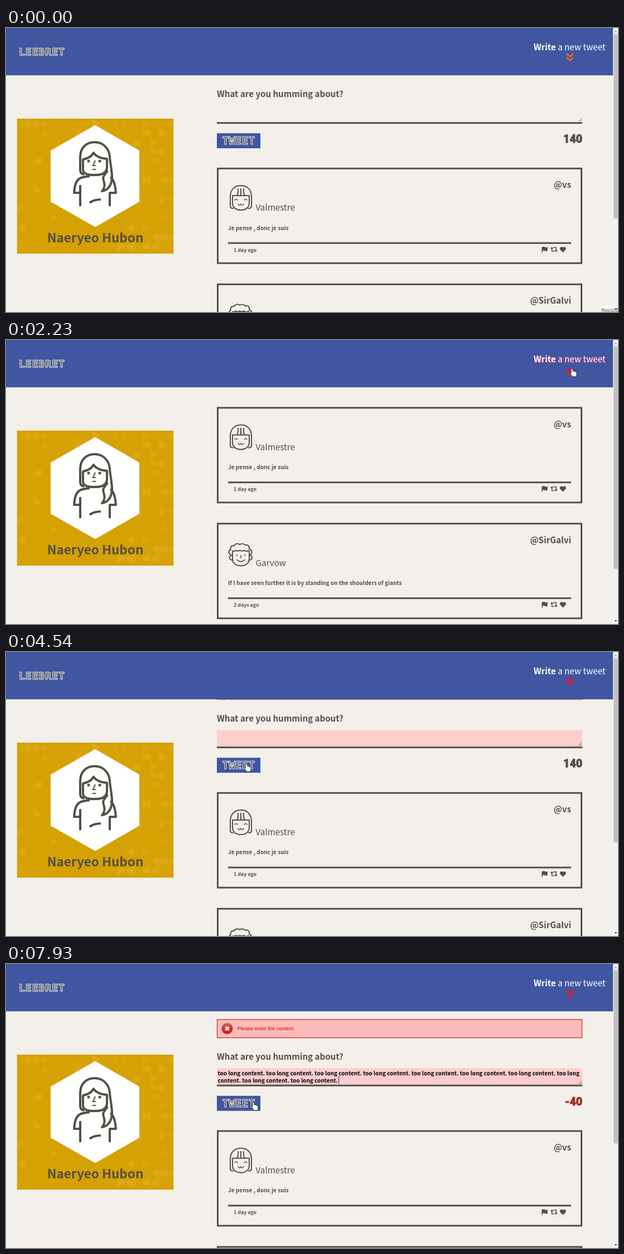
An HTML page for the animation above (8 s loop, 1097 by 510 pixels).

```html
<!DOCTYPE html>
<html lang="en">
<head>
<meta charset="utf-8">
<title>Short message page</title>
<style>
html, body { margin: 0; width: 100%; height: 100%; overflow: hidden; background: #f3f0eb }
svg { display: block }
text { font: 600 15.1px "Noto Sans CJK JP", "Noto Sans CJK SC", "Noto Sans CJK KR", "Open Sans", sans-serif; fill: inherit; white-space: pre }
.thin { font-weight: 200; font-size: 15.2px }
.body { font-size: 10.05px }
.small { font-size: 8.85px }
.chunky { font: bold 19px "DejaVu Sans Mono", monospace; stroke: currentColor; stroke-width: .9; letter-spacing: .35px }
.count { font: 900 19.5px Roboto, sans-serif; stroke: currentColor; stroke-width: .8 }
.alert { font: 9.3px "Liberation Sans", Arial, sans-serif }
.end { text-anchor: end }
.line { fill: none; stroke: #544f45; stroke-width: 2; stroke-linecap: round; stroke-linejoin: round }
</style>
</head>
<body>
<svg id="stage" width="1097" height="510" fill="#544f45">
  <defs>
    <g id="link"><text class="end" x="1074.5" y="40">Write<tspan class="thin"> a new tweet</tspan></text></g>
    <clipPath id="fold"><rect id="foldBox" x="370" y="85" width="680" height="140"/></clipPath>
    <radialGradient id="ball" cy=".3"><stop stop-color="#ef6a60"/><stop offset="1" stop-color="#d0211c"/></radialGradient>
    <g id="actions">
      <path d="M961 393v10M962 394q2-1.500 4 0t4 0v5.500q-2 1.500-4 0t-4 0z" stroke="#544f45" stroke-width="1.400"/>
      <path d="M978.500 395v6h4.500M981 394h5v6" fill="none" stroke="#544f45" stroke-width="1.600"/>
      <path d="M975.500 396.500l3-3.500 3 3.500zM983 399l3 3.500 3-3.500z"/>
      <path d="M998.300 403l-4.800-4.800c-2.500-3.500 2.500-7.200 4.800-3.700 2.300-3.500 7.300.2 4.800 3.700z"/>
    </g>
  </defs>

  <rect width="1097" height="510" fill="#f3f0eb"/>

  <svg x="19.500" y="162.500" width="281" height="243">
    <rect width="281" height="243" fill="#d5a103"/>
    <g id="tiles" fill="#e6bd4a"></g>
  </svg>
  <path d="M160 174.500l79 45.500v92l-79 45.500-80-45.500v-92z" fill="#fff"/>
  <g class="line" style="stroke-width:4;stroke-linecap:butt">
    <path d="M140 263q-7-1-7-8v-23c0-18 12-27 26-27s26 10 27 27c1 14 4 22 4 36 0 14-8 24-18 25 6-6 5-13 3-19-3-7 3-11 7-18"/>
    <path d="M138 236v17c0 9 8 11 20 11s22-2 23-13v-16c-10-1-19-3-24-11-3 6-8 10-19 12z"/>
    <path d="M150 266c-18 2-26 3-28 30h11M133 282v38M187 268c7 4 9 16 10 28h-11v24M150 314q7-6 20-6"/>
    <path d="M160 238l-4 9h5M155 254h6" stroke-width="2"/>
  </g>
  <circle cx="148" cy="239" r="2.500"/><circle cx="168" cy="239" r="2.500"/>
  <text x="160" y="385" text-anchor="middle" fill="#fff" style="font-size:22.5px">Naeryeo Hubon</text>

  <svg id="error" x="378" y="85" width="655" height="0" fill="#d8000c">
    <rect width="100%" height="100%" fill="#ffbaba" stroke="#d8000c" stroke-width="2"/>
    <circle cx="18.500" cy="50%" r="10" fill="url(#ball)" stroke="#a99" />
    <svg x="14.500" y="50%" width="8" height="8" overflow="visible"><path d="M1-3l6 6m0-6l-6 6" stroke="#fff" stroke-width="2.600"/></svg>
    <text id="errorText" class="alert" x="36.500">Please enter the content.</text>
  </svg>

  <g id="form"><g clip-path="url(#fold)">
    <text x="378" y="124">What are you humming about?</text>
    <rect id="field" x="378" y="139.500" width="655" height="30" fill="#ffcdcd"/>
    <rect x="378" y="169" width="655" height="3"/>
    <path d="M1026.500 168l5.500-5.500m-2.500 5.500l2.500-2.500" stroke="#544f45" stroke-width=".9"/>
    <g id="typed" fill="#000">
      <text class="body" id="row1" x="379.500" y="152"></text>
      <text class="body" id="row2" x="379.500" y="165"></text>
    </g>
    <rect id="caret" width="1" height="14.500" fill="#444"/>
    <rect x="378" y="189" width="78" height="27" fill="#4056a1"/>
    <text class="chunky" x="387.500" y="209" fill="#fff" color="#fff">TWEET</text>
    <text id="count" class="count end" x="1033" y="206">140</text>
  </g></g>

  <g id="cards"></g>

  <rect width="1088" height="85" fill="#4056a1"/>
  <text class="chunky" x="23" y="48.500" fill="#fff" color="#fff" style="font-size:18.500px;letter-spacing:.7px">LEEBRET</text>
  <use id="glow" href="#link" x="1" y="1" fill="#f0205a"/>
  <use href="#link" fill="#fff"/>
  <path id="chevrons" d="M1005 46l6 5.500 6-5.500m-12 7l6 5.500 6-5.500" fill="none" stroke-width="2.500"/>

  <rect x="1088" width="9" height="510" fill="#f1f1f1"/>
  <rect id="thumb" x="1089" y="11" width="8" fill="#c1c1c1"/>
  <path d="M1090.500 7.500l2.500-3 2.500 3z" fill="#a3a3a3"/>
  <g id="popup">
    <rect x="1063.500" y="497.500" width="34" height="13" fill="#f8f6f3" stroke="#e9e6e2"/>
    <text id="popupText" class="alert" x="1067" y="509.500" fill="#ccc">Record</text>
  </g>
  <path d="M1090.500 503l2.500 3 2.500-3z" fill="#505050"/>

  <circle id="press" r="9.500" fill="#ffd800" opacity=".6"/>
  <g id="cursor" stroke-linejoin="round">
    <path id="arrow" d="M0 0v13l3-2.800 2 4.800 2.200-1-2-4.500h4z" fill="#fff" stroke="#000" stroke-width=".8"/>
    <path id="hand" d="M-1 1q1.500-2 3 0v4q2-1 3 .5 2-.5 2.500 1 1.500 0 1.500 1.500v3q0 1.500-1.500 4h-6l-4-5.500q-1-2 1-2l.5 1z" fill="#fff" stroke="#000" stroke-width=".8"/>
    <path id="beam" d="M-2-5.500h1.500l.5.500.5-.5h1.500M0-5v10M-2 5.500h1.500l.5-.5.5.5h1.500" fill="none" stroke="#555"/>
  </g>
</svg>
<script>
const $ = id => document.getElementById(id);
const set = (id, attrs) => { for (const k in attrs) $(id).setAttribute(k, attrs[k]); };
const show = (id, on) => set(id, { visibility: on ? 'visible' : 'hidden' });

const faces = [
  `<path d="M407 324q-5 0-5-4v-17c0-13 8-20 19-20s19 7 19 20v17q0 4-5 4M406 301v13c0 9 7 13 15 13s15-4 15-13v-13zM414 301q3-5 2-12M428 301q-3-5-2-12M421 301v-12"/>
   <path d="M410 309q2.500-3 5 0M427 309q2.500-3 5 0M416 316q2.500 5 5 0 2.500 5 5 0" stroke-width="1.500"/>`,
  `<path d="M404 309c-6-3-6-8-1-10-2-6 3-8 6-7 2-5 8-4 10-2 4-3 8-1 10 1 5-2 8 3 7 7 6 2 6 8 1 11M407 301q3 2 5-1 4 3 7 0 4 3 7 0 3 3 9 1M406 302v14c0 8 8 12 15 12s15-4 15-12v-14M405 309q-5 1-4 5t6 4M437 309q5 1 4 5t-6 4"/>
   <path d="M414 308v2M428 308v2M421 309v5M414 317q7 7 14 0" stroke-width="1.500"/>`
];
const card = (i, handle, name, quote, age) => `
  <g transform="translate(0 ${i * 208})">
    <rect x="379.500" y="252.300" width="652" height="170" fill="none" stroke="#544f45" stroke-width="3"/>
    <text class="end" x="1013" y="287" fill="#c8caf4">${handle}</text>
    <g class="line">${faces[i]}</g>
    <text class="thin" x="447.500" y="328">${name}</text>
    <text class="body" x="398" y="362.500">${quote}</text>
    <rect x="398" y="384.700" width="615" height="3"/>
    <text class="small" x="408" y="401.500">${age}</text>
    <use href="#actions"/>
  </g>`;
$('cards').innerHTML =
  card(0, '@vs', 'Valmestre', 'Je pense , donc je suis', '1 day ago') +
  card(1, '@SirGalvi', 'Garvow', 'If I have seen further it is by standing on the shoulders of giants', '2 days ago');

let seed = 7;
const rand = () => (seed = seed * 16807 % 2147483647) / 2147483647;
let tiles = '';
for (let i = 0; i < 110; i++) {
  const x = Math.floor(rand() * 20) * 15, y = Math.floor(rand() * 15) * 17, d = rand() < .5 ? 15 : -15;
  tiles += `<path d="M${x} ${y}v18l${d}-9z" opacity="${(rand() * .3).toFixed(2)}"/>`;
}
$('tiles').innerHTML = tiles;

const phrase = 'too long content. ';
$('row1').textContent = phrase.repeat(7) + 'too long';
$('row2').textContent = 'content. ' + phrase.repeat(2);

// pointer path: time, x, y
const path = [
  [350, 1066, 482], [1080, 1014, 51], [3540, 1014, 51], [4210, 430, 200], [5780, 430, 200],
  [6010, 894, 243], [6150, 702, 198], [6920, 702, 198], [7280, 469, 238], [7710, 469, 238], [7930, 443, 248]
];
const presses = [1680, 2780, 4410, 6160];
const swing = (t, from, to) => .5 - Math.cos(Math.PI * Math.min(1, Math.max(0, (t - from) / (to - from)))) / 2;
const within = (v, a, b) => v >= a && v < b;

function pointer(t) {
  const i = path.findIndex(p => p[0] > t);
  if (i < 1) return path[i ? path.length - 1 : 0].slice(1);
  const a = path[i - 1], b = path[i], k = swing(t, a[0], b[0]);
  return [a[1] + (b[1] - a[1]) * k, a[2] + (b[2] - a[2]) * k];
}

function draw(t) {
  const open = 1 - swing(t, 1770, 2190) + swing(t, 2840, 3220);
  const err = swing(t, 4490, 5090);
  const push = 47.7 * err, shift = push - 130.5 * (1 - open);
  const filled = t >= 6560;

  set('form', { transform: `translate(0 ${push})` });
  set('foldBox', { height: 132 * open });
  set('cards', { transform: `translate(0 ${shift})` });
  set('thumb', { height: 490 * 510 / (755 + shift) });
  set('error', { y: 85 + 14.3 * err, height: 33.7 * err });
  set('errorText', { y: 9.4 + 10.8 * err });
  show('error', err > 0);
  show('field', t >= 4490);
  show('typed', filled);
  $('count').textContent = filled ? '-40' : '140';
  set('count', { fill: filled ? '#f00' : '#544f45', color: filled ? '#f00' : '#544f45' });

  show('caret', within(t, 3210, 3710) || within(t, 4210, 4410) || within(t, 6160, 7110) || t >= 7720);
  set('caret', filled ? { x: 596, y: 153.5 } : { x: 379, y: 140 });

  const [x, y] = pointer(t);
  const onLink = x > 945 && y < 62;
  const onButton = within(x, 378, 456) && within(y, 189 + push, 216 + push);
  const onField = within(x, 378, 1033) && within(y, 139 + push, 172 + push);
  const kind = onLink || onButton ? 'hand' : onField ? 'beam' : 'arrow';
  const visible = t >= 350 && !within(t, 6560, 6920);
  for (const k of ['hand', 'beam', 'arrow']) show(k, visible && k === kind);
  set('cursor', { transform: `translate(${x} ${y})` });
  set('press', { cx: x, cy: y + (kind === 'hand' ? 2 : 0) });
  show('press', presses.some(p => within(t, p, p + 110)));

  show('glow', onLink);
  set('chevrons', {
    stroke: onLink || t > 1680 ? '#f5141e' : '#ee6c1c',
    transform: `translate(0 ${onLink ? 4.500 : 0})`
  });
  show('popup', t < 350);
  show('popupText', t < 20);
}

let start;
function tick(now) {
  start ??= now;
  draw((now - start) % 8000);
  requestAnimationFrame(tick);
}
draw(0);
requestAnimationFrame(tick);
</script>
</body>
</html>
```
